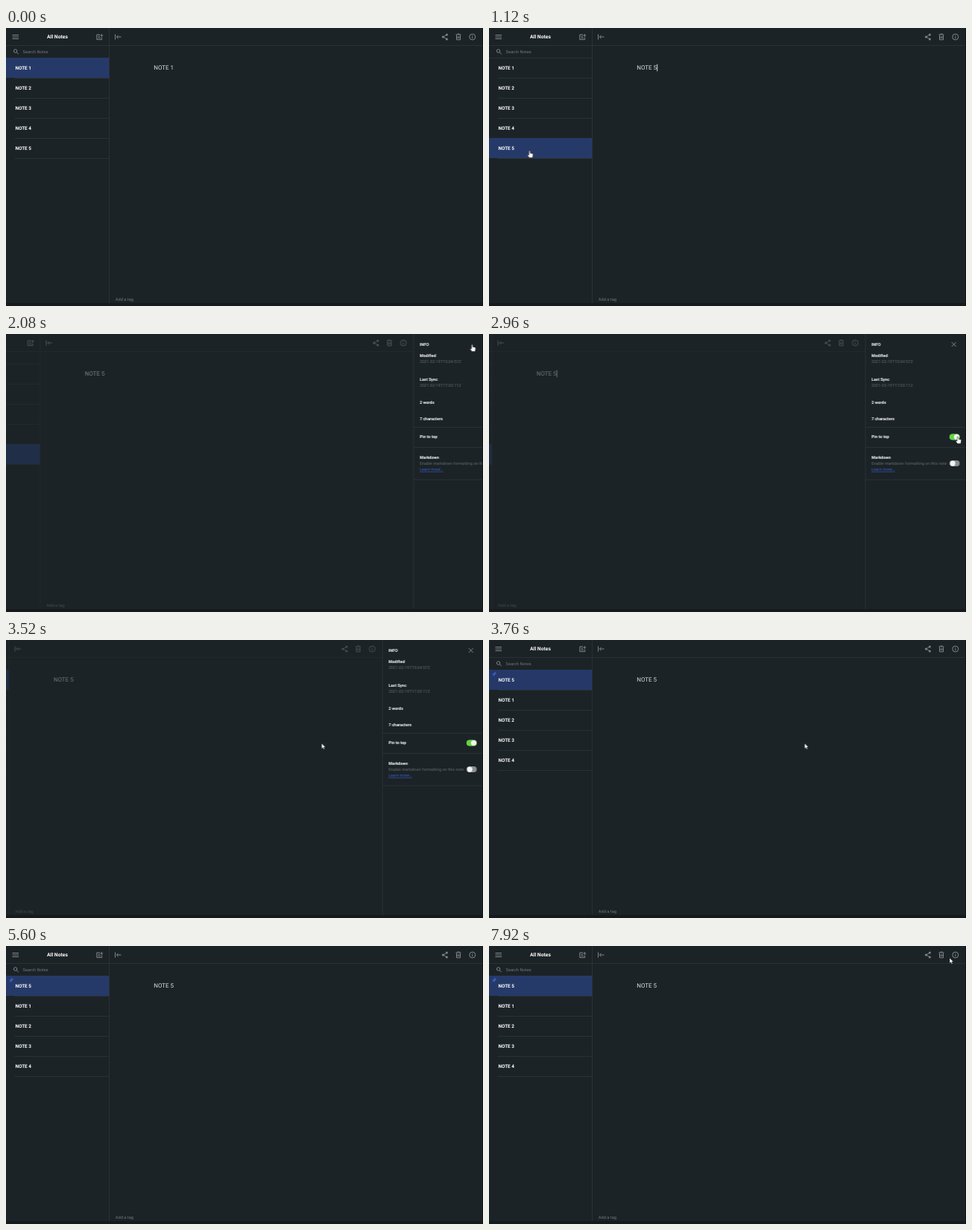
Animation of 640x374 px, one loop 8 s. Source, as an HTML page:

```html
<!DOCTYPE html>
<html lang="en">
<head>
<meta charset="utf-8">
<title>Notes</title>
<style>
html, body { margin: 0; width: 100%; height: 100%; overflow: hidden; background: #1c2326; }
svg { display: block; width: 100%; height: 100%; }
text { font-family: Roboto, "Liberation Sans", sans-serif; fill: #fff; text-rendering: geometricPrecision; }
.title { font-size: 6.8px; font-weight: 700; text-anchor: middle; }
.list { font-size: 6.4px; font-weight: 700; }
.note { font-size: 8px; fill: #dcdee0; }
.hint { font-size: 5.7px; fill: #71777b; }
.head { font-size: 5.5px; font-weight: 700; }
.small { font-size: 5.5px; fill: #646b70; }
.link { font-size: 5.5px; fill: #3a5fd0; text-decoration: underline; }
.rule { stroke: #2b3236; stroke-width: 1; fill: none; }
.icon { stroke: #80868a; stroke-width: 1; fill: none; }
.fill { fill: #80868a; stroke: none; }

/* One percent of the loop is 80 ms. */
.anim { animation: 8s infinite; }
.step { animation: 8s step-end infinite; }

#shift { animation-name: shift; }
@keyframes shift {
  0%, 24.45% { transform: translateX(0); animation-timing-function: ease-in-out; }
  27%, 44% { transform: translateX(-134.5px); animation-timing-function: ease-in-out; }
  46.8%, 100% { transform: translateX(0); }
}
#main { animation-name: dim; }
@keyframes dim {
  0%, 24.45% { opacity: 1; }
  27%, 44% { opacity: .45; }
  48%, 100% { opacity: 1; }
}
#sel { animation-name: select; }
@keyframes select {
  0% { transform: translateY(0); }
  13% { transform: translateY(108px); }
  38%, 100% { transform: translateY(0); }
}
.first { animation-name: first; }
@keyframes first { 0% { opacity: 1; } 13%, 100% { opacity: 0; } }
.second { animation-name: second; }
@keyframes second { 0% { opacity: 0; } 13%, 100% { opacity: 1; } }
.before { animation-name: before; }
@keyframes before { 0% { opacity: 1; } 38%, 100% { opacity: 0; } }
.after { animation-name: after; }
@keyframes after { 0% { opacity: 0; } 38%, 100% { opacity: 1; } }
#on { animation-name: pin; }
@keyframes pin { 0% { opacity: 0; } 34%, 100% { opacity: 1; } }
#caret { animation-name: blink; }
@keyframes blink {
  0%, 7.6%, 19%, 33%, 42%, 100% { opacity: 0; }
  1%, 13%, 27%, 36% { opacity: 1; }
}

#cursor { animation-name: travel; animation-timing-function: ease-in-out; }
@keyframes travel {
  0%, 5% { transform: translate(120px, 14px); }
  11%, 15% { transform: translate(54.5px, 165px); }
  17%, 18.5% { transform: translate(128px, 161px); }
  23%, 26.3% { transform: translate(625.5px, 14px); }
  28.9%, 29.5% { transform: translate(606px, 136px); }
  31%, 38% { transform: translate(629px, 138px); }
  43%, 48% { transform: translate(423.5px, 139px); }
  54% { transform: translate(210px, 153px); }
  58% { transform: translate(8px, 43px); }
  61%, 64.5% { transform: translate(34.5px, 52.5px); }
  69% { transform: translate(126px, 52.5px); }
  72% { transform: translate(162px, 17px); }
  75%, 76% { transform: translate(172px, 3px); }
  97.5%, 98.2% { transform: translate(615.5px, 18.5px); }
  98.8%, 100% { transform: translate(618px, 16px); }
}
#arrow { animation-name: arrow; }
@keyframes arrow {
  0%, 9%, 23%, 55%, 76%, 100% { opacity: 0; }
  5%, 18.9%, 40%, 71.9%, 97.9% { opacity: 1; }
}
#hand { animation-name: hand; }
@keyframes hand {
  0%, 18.9%, 40%, 69.5%, 100% { opacity: 0; }
  9%, 23%, 55% { opacity: 1; }
}
</style>
</head>
<body>
<svg viewBox="0 0 640 374" preserveAspectRatio="none">
  <rect width="640" height="374" fill="#1c2326"/>
  <g id="shift" class="anim">
    <g id="main" class="anim">
      <path class="rule" d="M0 23.5H640M138.5 0V370M0 40.5H138M12 67.5H138M12 94.5H138M12 121.5H138M12 148.5H138M12 175.5H138"/>
      <rect id="sel" class="step" y="40" width="138" height="27" fill="#263a69"/>

      <path class="icon" d="M8.5 9.5H17M8.5 12H17M8.5 14.5H17"/>
      <text class="title" x="69" y="14.2">All Notes</text>
      <path class="icon" d="M126 8.9H121.8V15.6H128.6V12.6M126.4 10H130.2M128.3 8.1V11.9M123.4 11.2H126M123.4 13.4H127"/>
      <g class="icon" stroke-width=".8">
        <circle cx="12.6" cy="31" r="2.2"/>
        <path d="M14.2 32.6L16.8 35.1"/>
      </g>
      <text class="hint" x="22.6" y="33.8">Search Notes</text>

      <g class="list step before">
        <text x="12.5" y="56.2">NOTE 1</text>
        <text x="12.5" y="83.2">NOTE 2</text>
        <text x="12.5" y="110.2">NOTE 3</text>
        <text x="12.5" y="137.2">NOTE 4</text>
        <text x="12.5" y="164.2">NOTE 5</text>
      </g>
      <g class="list step after">
        <text x="12.5" y="56.2">NOTE 5</text>
        <text x="12.5" y="83.2">NOTE 1</text>
        <text x="12.5" y="110.2">NOTE 2</text>
        <text x="12.5" y="137.2">NOTE 3</text>
        <text x="12.5" y="164.2">NOTE 4</text>
        <path d="M7.4 42.4L10.4 45.2L9.2 45.6L7.6 47.2L7.5 48.8L6 47.4L4 49.3L5.4 46.8L4.2 45.4L5.8 45.2L7.2 43.7Z" fill="#3c5cc4"/>
      </g>

      <path class="icon" d="M146.5 8.4V15.6M148.4 12H154.5M150.6 9.8L148.4 12L150.6 14.2"/>
      <path class="icon" d="M591.4 9.1L586.4 12L591.4 14.9"/>
      <g class="fill">
        <circle cx="591.4" cy="9.1" r="1.5"/>
        <circle cx="586.4" cy="12" r="1.5"/>
        <circle cx="591.4" cy="14.9" r="1.5"/>
      </g>
      <path class="icon" d="M603.5 8.9H610.5M605.5 8H608.5M604.5 9.5V15.8H609.5V9.5M606.1 11.2V14.2M607.9 11.2V14.2"/>
      <circle class="icon" cx="625.8" cy="12" r="4"/>
      <path class="icon" d="M625.8 9.6V10.6M625.8 11.4V14.3"/>

      <text class="note step first" x="198.2" y="56.1">NOTE 1</text>
      <text class="note step second" x="198.2" y="56.1">NOTE 5</text>
      <rect id="caret" class="step" x="225.2" y="48.6" width="1" height="9.6" fill="#d5d8da"/>
      <text class="hint" x="146.8" y="366.7">Add a tag</text>
    </g>

    <g transform="translate(639.5 0)">
      <rect width="135" height="370" fill="#1c2326"/>
      <path class="rule" d="M0 0V370M0 125.5H135M0 152.5H135M0 196H135"/>
      <g class="head">
        <text x="8.2" y="15.8">INFO</text>
        <text x="8.2" y="31.2">Modified</text>
        <text x="8.2" y="62.8">Last Sync</text>
        <text x="8.2" y="94.3">2 words</text>
        <text x="8.2" y="116.2">7 characters</text>
        <text x="8.2" y="140">Pin to top</text>
        <text x="8.2" y="167.5">Markdown</text>
      </g>
      <text class="small" x="8.2" y="39.2">2021-02-19T15:04:57Z</text>
      <text class="small" x="8.2" y="70.9">2021-02-19T17:03:11Z</text>
      <text class="small" x="8.2" y="176">Enable markdown formatting on this note</text>
      <text class="link" x="8.2" y="184.4">Learn more…</text>
      <path class="icon" stroke-width=".9" d="M115.8 11L121.8 17M121.8 11L115.8 17"/>
      <g id="off">
        <rect x="113" y="134.5" width="13.5" height="8" rx="4" fill="#8c8f91"/>
        <circle cx="117.1" cy="138.5" r="3.6" fill="#f4f4f4"/>
      </g>
      <use href="#off" y="35.6"/>
      <g id="on" class="step">
        <rect x="113" y="134.5" width="13.5" height="8" rx="4" fill="#5fd83a"/>
        <circle cx="122.4" cy="138.5" r="3.6" fill="#f4f4f4"/>
      </g>
    </g>
  </g>

  <rect y="370" width="640" height="4" fill="#171a1c"/>
  <rect x="639" width="1" height="374" fill="#0f1213"/>

  <g id="cursor" class="anim" stroke="#14181a" stroke-width=".5" stroke-linejoin="round">
    <path id="arrow" class="step" fill="#fff" d="M0 0V7.2L1.6 5.8L2.8 8.3L4 7.7L2.9 5.3H5.1Z"/>
    <path id="hand" class="step" fill="#fff" d="M-.9 .7Q0 -.5 .8 .7V3.3L3.6 4Q4.8 4.4 4.6 5.6L3.9 9.6H-.4L-2.6 6.4Q-2.9 5.4 -1.9 5.4L-.9 6.2Z"/>
  </g>
</svg>
</body>
</html>
```
